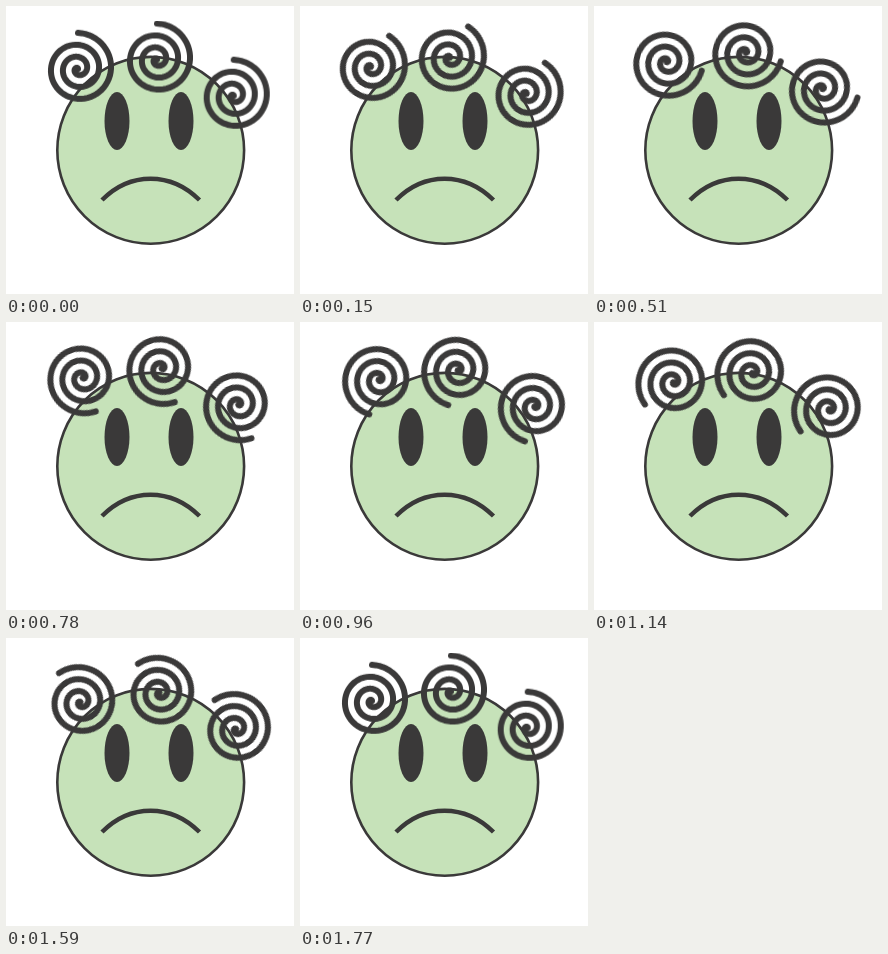
Recreate the animation shown at these times as an HTML page. Size 288 px wide and 288 px high, loop 1800 ms.

```html
<!DOCTYPE html>
<html lang="en">
<head>
<meta charset="utf-8">
<title>Dizzy face</title>
<style>
  html, body { margin: 0; width: 100%; height: 100%; overflow: hidden; background: #fff; }
  svg { display: block; width: 100vw; height: 100vh; }
  .line { fill: none; stroke: #3a3939; }
  /* 60 poses from 0 to a full turn, both ends included */
  .curl { transform-origin: 0 0; animation: spin 1800ms steps(60, jump-none) infinite; }
  @keyframes spin { from { transform: rotate(0deg); } to { transform: rotate(360deg); } }
</style>
</head>
<body>
<svg viewBox="0 0 288 288">
  <defs>
    <path id="spiral" class="line" stroke-width="6" stroke-linecap="round" stroke-linejoin="round"/>
  </defs>
  <circle cx="144.7" cy="144.3" r="93.4" fill="#c6e2b9" stroke="#3a3939" stroke-width="2.6"/>
  <g fill="#3a3939">
    <ellipse cx="111" cy="115" rx="12.5" ry="29"/>
    <ellipse cx="175" cy="115" rx="12.5" ry="29"/>
  </g>
  <path class="line" stroke-width="4.5" d="M96 194C124 165.5 165 165.5 193.500 194"/>
  <g transform="translate(75 59.8)"><use class="curl" href="#spiral"/></g>
  <g transform="translate(154 50.5)"><use class="curl" href="#spiral"/></g>
  <g transform="translate(230.700 86.700)"><use class="curl" href="#spiral"/></g>
</svg>
<script>
  // Archimedean spiral, outer tip pointing up, winding clockwise into an off-centre pole
  const pole = { x: -3, y: 3 }, outer = 36, turns = 3, steps = 180;
  const points = Array.from({ length: steps + 1 }, (_, i) => {
    const t = i / steps, a = t * turns * 2 * Math.PI, r = outer * (1 - t);
    return `${(pole.x + r * Math.sin(a)).toFixed(2)} ${(pole.y - r * Math.cos(a)).toFixed(2)}`;
  });
  document.getElementById('spiral').setAttribute('d', 'M' + points.join('L'));
</script>
</body>
</html>
```
